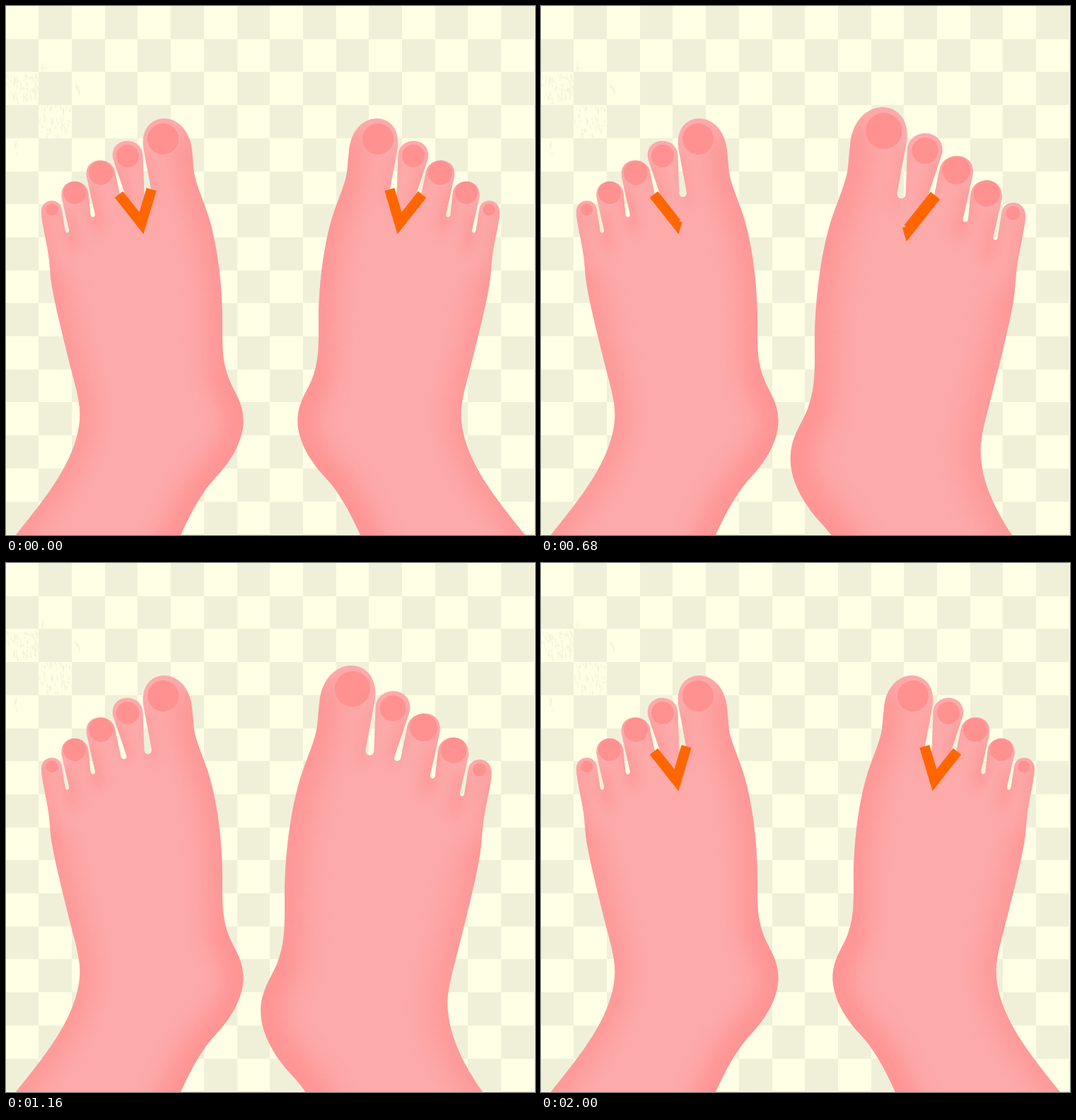
An HTML page with a canvas for the animation above (5000 ms loop, 748 by 748 pixels).

```html
<!DOCTYPE html>
<html lang="en">
<head>
<meta charset="utf-8">
<title>Feet on tiles</title>
<style>
  html, body { margin: 0; width: 100%; height: 100%; overflow: hidden; background: #ffffe5; }
  canvas { display: block; width: 100vw; height: 100vh; }
</style>
</head>
<body>
<canvas id="stage" width="748" height="748"></canvas>
<script>
const SIZE = 748, LOOP = 5000, STEP = 40;
const SKIN = '#fdaaaa', SHADE = '#ff9191', ORANGE = '#ff6600';
const ctx = document.getElementById('stage').getContext('2d');

// Outline of the left foot, split so that its sides can also be shaded.
const leftSide = 'M-14 782L14 748C52 700 104 640 104.5 577C104.5 560 98 536 95 525' +
  'C84 482 70 426 65 397C62 380 62 365 60 352C57 330 50 305 50 291';
const toes = 'C50 271 77 270 79 288L83.5 317C84 322 90 322 89 316L78.5 271' +
  'C75 242 114 241 116.5 265L119.5 295C120 300 126 300 126 295L114 242' +
  'C109 212 151 211 154.5 236L162 272C163 279 171 279 170.5 273L151 215' +
  'C147 184 192 183 193.5 211L195.5 265C196 272 206 272 206 264L194 200' +
  'C188 145 258 144 263 205';
const rightSide = 'C265 222 265 235 268 245C273 263 283 285 288 303C300 345 306 400 306 445' +
  'C306 480 305 500 315 527C322 545 335.5 560 335.5 587C335.5 617 315 647 297 666' +
  'C277 687 262 715 247 748L232 782';
const foot = new Path2D(leftSide + toes + rightSide + 'Z');
const nails = [[222, 188, 22], [172, 212, 16], [134, 236, 17], [97, 264, 16], [65, 288, 8.5]];

// The mark between the toes: start, corner, end.
const mark = [[159.5, 266.5], [191.5, 307], [205.7, 259.3]];

function seeded(seed) {
  return () => (seed = (seed * 16807) % 2147483647) / 2147483647;
}

function layer(paint) {
  const c = document.createElement('canvas');
  c.width = c.height = SIZE;
  paint(c.getContext('2d'));
  return c;
}

const floor = layer(g => {
  const cell = 46.7, rnd = seeded(71);
  g.fillStyle = '#ffffe5';
  g.fillRect(0, 0, SIZE, SIZE);
  g.fillStyle = '#f0f0d8';
  for (let row = 0; row < 17; row++) {
    for (let col = 0; col < 17; col++) {
      if ((row + col) % 2) {
        const x = Math.round(col * cell - 0.4), y = Math.round(row * cell);
        g.fillRect(x, y, Math.round((col + 1) * cell - 0.4) - x, Math.round((row + 1) * cell) - y);
      }
    }
  }
  // Worn patches: x, y, width, height, number of flecks.
  const worn = [[0, 95, 45, 40, 75], [47, 141, 43, 44, 55], [47, 76, 10, 12, 5],
                [98, 108, 6, 16, 5], [10, 188, 6, 20, 5]];
  g.lineWidth = 1.6;
  g.lineCap = 'round';
  for (const [x, y, w, h, n] of worn) {
    for (let i = 0; i < n; i++) {
      const px = x + rnd() * w, py = y + rnd() * h, len = 2 + rnd() * 4;
      g.strokeStyle = `rgba(240,240,216,${0.4 + rnd() * 0.5})`;
      g.beginPath();
      g.moveTo(px, py);
      g.lineTo(px + 0.8, py + len);
      g.stroke();
    }
  }
});

// Soft shading with a fine grain.
const shading = layer(g => {
  const soft = (d, width, blur, alpha) => {
    g.filter = `blur(${blur}px)`;
    g.globalAlpha = alpha;
    g.lineWidth = width;
    g.stroke(new Path2D(d));
  };
  g.strokeStyle = SHADE;
  g.lineCap = 'round';
  soft('M263 205' + rightSide, 52, 14, 0.7);
  soft('M315 527C322 545 335.5 560 335.5 587C335.5 617 315 647 297 666C277 687 262 715 247 748L232 782', 50, 14, 0.5);
  soft('M-14 782L14 748C52 700 104 640 104.5 577C104.5 560 98 536 95 525C84 482 70 426 65 397', 46, 14, 0.65);
  soft('M65 397C60 360 54 325 50 291', 20, 8, 0.5);
  soft('M88 298L95 340', 16, 8, 0.65);
  soft('M120 265L130 310', 16, 8, 0.7);
  soft('M158 230L172 272', 14, 7, 0.55);
  soft('M200 215L209 275', 12, 7, 0.45);
  soft('M88 256C94 250 102 250 108 256M122 228C130 220 140 220 147 228', 12, 5, 0.5);

  const img = g.getImageData(0, 0, SIZE, SIZE), px = img.data, rnd = seeded(9);
  for (let i = 3; i < px.length; i += 4) {
    const a = px[i] / 255;
    if (a) px[i] = 255 * (a + (rnd() - 0.5) * 0.7 * a * (1 - a));
  }
  g.putImageData(img, 0, 0);
});

const ramp = (t, from, to) => Math.min(1, Math.max(0, (t - from) / (to - from)));

function drawMark(part) {
  if (part <= 0) return;
  const [a, b, c] = mark;
  const first = Math.hypot(b[0] - a[0], b[1] - a[1]);
  const second = Math.hypot(c[0] - b[0], c[1] - b[1]);
  const len = part * (first + second);
  const along = (p, q, k) => ctx.lineTo(p[0] + (q[0] - p[0]) * k, p[1] + (q[1] - p[1]) * k);
  ctx.beginPath();
  ctx.moveTo(...a);
  along(a, b, Math.min(1, len / first));
  if (len > first) along(b, c, (len - first) / second);
  ctx.lineWidth = 14.5;
  ctx.lineJoin = 'miter';
  ctx.strokeStyle = ORANGE;
  ctx.stroke();
}

function drawFoot(part) {
  ctx.fillStyle = SKIN;
  ctx.fill(foot);
  ctx.save();
  ctx.clip(foot);
  ctx.drawImage(shading, 0, 0);
  ctx.restore();
  ctx.fillStyle = SHADE;
  for (const [x, y, r] of nails) {
    ctx.beginPath();
    ctx.arc(x, y, r, 0, Math.PI * 2);
    ctx.fill();
  }
  drawMark(part);
}

function render(ms) {
  const t = Math.floor((ms % LOOP) / STEP) * STEP;
  const part = t < 1400 ? 1 - ramp(t, 480, 920) : ramp(t, 1480, 2000);
  const scale = 1 + 0.25 * (ramp(t, 0, 1040) - ramp(t, 1040, 1320));

  ctx.drawImage(floor, 0, 0);
  drawFoot(part);

  // The right foot is a mirror image that swells about a point near its outer side.
  ctx.save();
  ctx.translate(778, 257.5);
  ctx.scale(scale, scale);
  ctx.translate(SIZE - 778, -257.5);
  ctx.scale(-1, 1);
  drawFoot(part);
  ctx.restore();
}

const start = performance.now();
function tick() {
  render(performance.now() - start);
  requestAnimationFrame(tick);
}
tick();
</script>
</body>
</html>
```
